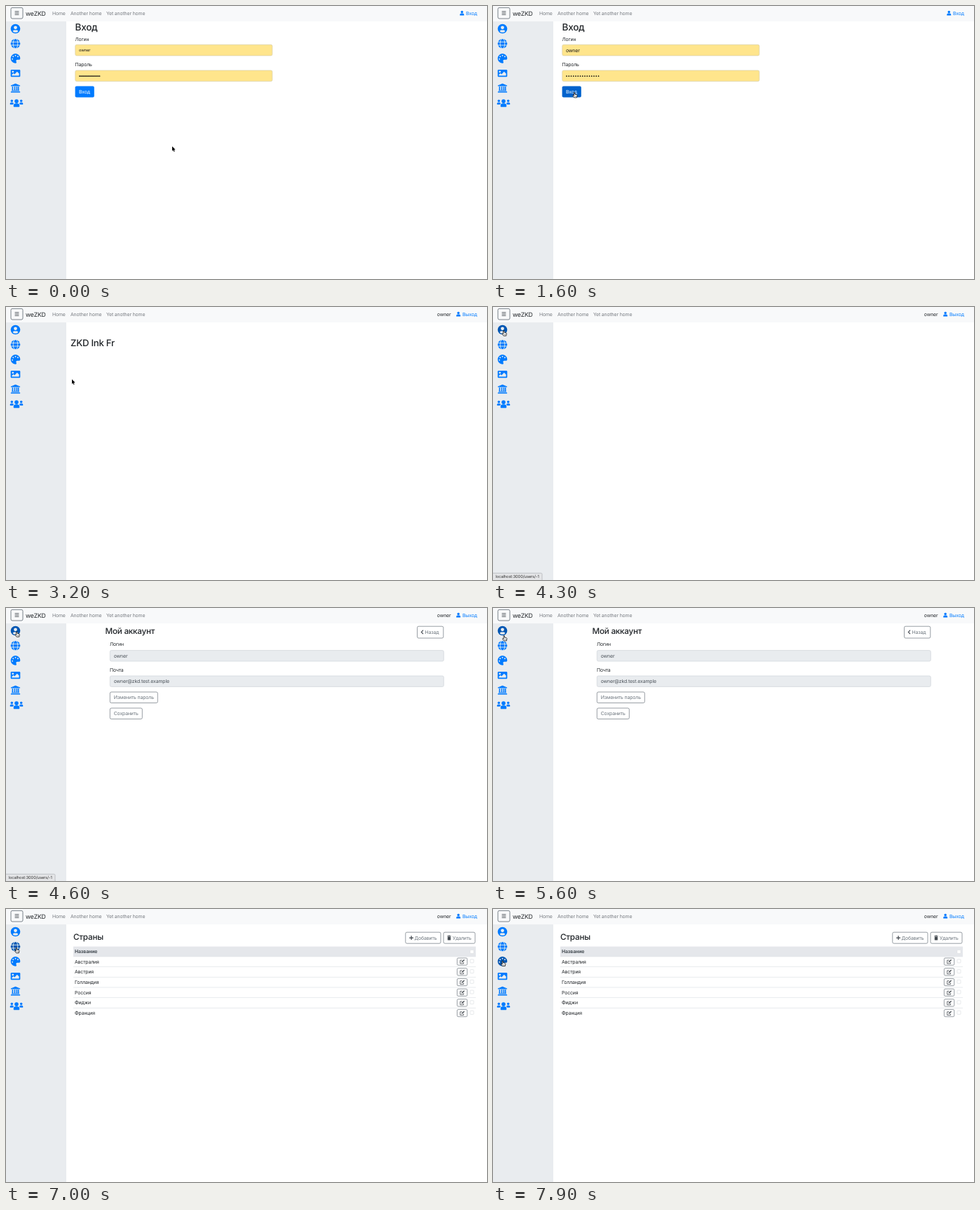
Write an HTML page with a canvas that moves like this. It is 686x390 px and loops after 8 s.

```html
<!DOCTYPE html>
<html lang="ru">
<head>
<meta charset="utf-8">
<title>weZKD</title>
<style>
  html, body { margin: 0; width: 100%; height: 100%; overflow: hidden; background: #fff; }
  canvas { display: block; width: 686px; height: 390px; }
</style>
</head>
<body>
<canvas id="stage"></canvas>
<script>
const W = 686, H = 390, LOOP = 8000, STEP = 100;
const canvas = document.getElementById('stage');
const dpr = window.devicePixelRatio || 1;
canvas.width = W * dpr;
canvas.height = H * dpr;
const ctx = canvas.getContext('2d');

const BLUE = '#007bff', DARK_BLUE = '#0056b3', INK = '#212529', GREY = '#6c757d';
const SIDE = '#e9ecef', NAV = '#f8f9fa', LINE = '#dee2e6';
const FONT = 'Inter, "Open Sans", sans-serif';
const USER = 'owner', BRAND = 'weZKD', SLOGAN = 'ZKD Ink Frontend';
const COUNTRIES = ['Австралия', 'Австрия', 'Голландия', 'Россия', 'Фиджи', 'Франция'];

// Moments of the session, in ms
const T = { fill: 1300, home: 1900, type: 2300, account: 4200, accountReady: 4500, countries: 6300, countriesReady: 6500 };
const LINKS = [
  { from: 4100, to: 5000, url: 'localhost:3000/users/-1', w: 70 },
  { from: 6200, to: 7000, url: 'localhost:3000/countries', w: 73.5 }
];
const MOUSE = [
  [100, 237, 200.5], [900, 116, 123.3], [2600, 116, 123.3], [3200, 94, 103.3], [3900, 15.3, 33.6],
  [5400, 15.3, 33.6], [5600, 15.8, 39.3], [6000, 14.8, 55.3], [7200, 14.8, 55.3], [7700, 13.8, 74]
];

function text(s, x, y, size = 6.9, color = INK, weight = 400) {
  ctx.font = `${weight} ${size}px ${FONT}`;
  ctx.letterSpacing = `${-0.02 * size}px`;
  ctx.fillStyle = color;
  ctx.fillText(s, x, y);
}

function rect(x, y, w, h, color) {
  ctx.fillStyle = color;
  ctx.fillRect(x, y, w, h);
}

function box(x, y, w, h, fill, stroke, r = 2, lw = 0.7) {
  ctx.beginPath();
  ctx.roundRect(x, y, w, h, r);
  if (fill) { ctx.fillStyle = fill; ctx.fill(); }
  if (stroke) { ctx.strokeStyle = stroke; ctx.lineWidth = lw; ctx.stroke(); }
}

function disc(x, y, r, color) {
  ctx.fillStyle = color;
  ctx.beginPath();
  ctx.arc(x, y, r, 0, 7);
  ctx.fill();
}

function poly(color, ...p) {
  ctx.fillStyle = color;
  ctx.beginPath();
  for (let i = 0; i < p.length; i += 2) ctx.lineTo(p[i], p[i + 1]);
  ctx.closePath();
  ctx.fill();
}

function stroke(color, lw, ...p) {
  ctx.strokeStyle = color;
  ctx.lineWidth = lw;
  ctx.beginPath();
  for (let i = 0; i < p.length; i += 2) ctx.lineTo(p[i], p[i + 1]);
  ctx.stroke();
}

function at(x, y, draw) {
  ctx.save();
  ctx.translate(x, y);
  draw();
  ctx.restore();
}

// Head and shoulders; (x, y) is the centre of the head
function person(x, y, r, w, h, color) {
  disc(x, y, r, color);
  box(x - w / 2, y + r + 0.3, w, h, color, null, [w * 0.33, w * 0.33, 0.6, 0.6]);
}

const ICONS = [
  c => {
    disc(0, 0, 6.8, c);
    disc(0, -1.7, 2.4, SIDE);
    ctx.fillStyle = SIDE;
    ctx.beginPath();
    ctx.moveTo(-4, 3.4);
    ctx.quadraticCurveTo(-3, 1.8, -1.2, 1.7);
    ctx.quadraticCurveTo(0, 2.2, 1.2, 1.7);
    ctx.quadraticCurveTo(3, 1.8, 4, 3.4);
    ctx.quadraticCurveTo(2.4, 5.3, 0, 5.3);
    ctx.quadraticCurveTo(-2.4, 5.3, -4, 3.4);
    ctx.fill();
  },
  c => {
    disc(0, 0, 6.8, c);
    ctx.strokeStyle = SIDE;
    ctx.lineWidth = 0.9;
    ctx.beginPath();
    ctx.ellipse(0, 0, 3.3, 7.2, 0, 0, 7);
    ctx.stroke();
    for (const y of [-2.3, 2.3]) stroke(SIDE, 0.9, -7, y, 7, y);
  },
  c => {
    ctx.fillStyle = c;
    ctx.beginPath();
    ctx.moveTo(0.6, 6.8);
    ctx.arc(0, 0, 6.8, 1.5, 6.28);
    ctx.quadraticCurveTo(6.8, 1.9, 4.6, 1.9);
    ctx.lineTo(2.6, 1.9);
    ctx.bezierCurveTo(0.9, 1.9, 0.5, 3.4, 1.2, 4.6);
    ctx.quadraticCurveTo(2, 6.4, 0.6, 6.8);
    ctx.fill();
    for (const [x, y] of [[-4.3, 0.9], [-3.3, -2.6], [0, -4.2], [3.4, -2.6]]) disc(x, y, 0.95, SIDE);
  },
  c => {
    box(-6.8, -5.1, 13.6, 10.2, c, null, 1.3);
    disc(-3.7, -2.2, 1.3, SIDE);
    poly(SIDE, -5.1, 3.4, -5.1, 1.8, -2.9, -0.2, -1.3, 1.3, 2.3, -2.3, 5.1, 0.5, 5.1, 3.4);
  },
  c => {
    poly(c, 0, -6.6, 6.6, -3.9, 6.6, -2.9, -6.6, -2.9, -6.6, -3.9);
    for (const x of [-4.9, -1.8, 1.1, 3.4]) rect(x, -2.2, 1.6, 5.4, c);
    rect(-5.5, 3, 11, 1.1, c);
    rect(-6.6, 4.8, 13.2, 1.5, c);
  },
  c => {
    person(-5.2, -2.9, 1.75, 5, 3.1, c);
    person(8.2, -2.9, 1.75, 5, 3.1, c);
    disc(1.5, -1.9, 3.5, SIDE);
    box(-3.4, 0.2, 9.8, 6, SIDE, null, 3);
    person(1.5, -2.4, 2.8, 8.4, 5, c);
  }
];

function navbar(loggedIn) {
  rect(0, 0, W, 22, NAV);
  box(7, 2.4, 17, 15.6, null, GREY, 2, 0.9);
  for (let i = 0; i < 3; i++) rect(12.6, 7.4 + i * 2.2, 5.8, 0.9, '#444a50');
  text(BRAND, 28, 13.6, 8.7);
  text('Home', 66, 13, 6.9, '#777b80');
  text('Another home', 92, 13, 6.9, '#777b80');
  text('Yet another home', 143, 13, 6.9, '#777b80');
  if (loggedIn) text(USER, 614.8, 13);
  person(loggedIn ? 645.2 : 650.3, 8.5, 1.75, 6, 3, BLUE);
  if (loggedIn) text('Выход', 651, 13, 6.9, BLUE);
  else text('Вход', 656, 13, 6.9, BLUE);
}

function sidebar(hover) {
  rect(0, 22, 86, H - 22, SIDE);
  ICONS.forEach((icon, i) => at(13.5, 32.5 + i * 21.2, () => icon(i === hover ? DARK_BLUE : BLUE)));
}

function loginPage(t, hover) {
  const filled = t >= T.fill;
  text('Вход', 98.5, 35.4, 13.6, INK, 500);
  text('Логин', 98.5, 49.5);
  text('Пароль', 98.5, 86);
  for (const y of [55.3, 92]) box(98.8, y, 281, 15.6, '#ffe58c', '#d9cfa6');
  text(USER, 104, filled ? 65.6 : 65.4, filled ? 6.9 : 5.7, '#111');
  const gap = filled ? 3.25 : 2.03;
  for (let i = 0; i < 15; i++) disc(105 + i * gap, 100.2, filled ? 0.85 : 0.9, '#111');
  box(98.6, 114.6, 27.2, 15.8, !hover ? BLUE : filled ? '#0062cc' : '#0069d9');
  text('Вход', 104, 125.2, 6.9, '#fff');
}

function homePage(t) {
  const n = Math.floor((t - T.type) / STEP) + 1;
  if (n > 0) text(SLOGAN.slice(0, n), 92, 56.2, 13.2, INK, 500);
}

function button(label, x, y, w, h, tx) {
  box(x, y, w, h, '#fff', GREY);
  text(label, tx, y + h / 2 + 2.5, 6.9, GREY);
}

function field(label, value, y) {
  text(label, 148, y - 6.4);
  box(148.3, y, 476, 15.4, SIDE, '#ced4da');
  text(value, 153.7, y + 10.4, 6.9, '#495057');
}

function accountPage() {
  text('Мой аккаунт', 141.5, 37.3, 11.7, INK, 500);
  button('Назад', 586.5, 26.2, 37.3, 16.8, 597.6);
  stroke('#444a50', 1.2, 595, 31.6, 592.4, 34.4, 595, 37.2);
  field('Логин', USER, 60.6);
  field('Почта', USER + '@zkd.test.example', 97);
  button('Изменить пароль', 148.3, 120, 68, 15.6, 153.7);
  button('Сохранить', 148.3, 143, 46, 15.6, 153.7);
}

function editButton(y) {
  box(643.4, y - 5.2, 14.4, 10.2, '#fff', GREY, 1.6);
  stroke('#444a50', 0.8, 650.6, y - 2, 647.8, y - 2, 647.8, y + 2.8, 652.6, y + 2.8, 652.6, y + 0.8);
  stroke('#444a50', 1.4, 650, y + 0.8, 653.6, y - 2.6);
}

function countriesPage() {
  text('Страны', 96, 44, 11.7, INK, 500);
  button('Добавить', 569.8, 33.2, 50.2, 16, 582.6);
  rect(575.2, 40.6, 5.8, 1.3, '#444a50');
  rect(577.45, 38.3, 1.3, 5.8, '#444a50');
  button('Удалить', 624, 33.2, 45, 16, 637);
  rect(629.3, 38.3, 5.4, 0.9, '#444a50');
  rect(631, 37.6, 2, 0.8, '#444a50');
  box(629.8, 39.6, 4.4, 4.8, '#444a50', null, 0.5);

  rect(96, 53.6, 574, 14.4, '#e5e7eb');
  rect(96, 67.6, 574, 0.7, LINE);
  text('Название', 98, 63.4, 6.9, '#495057', 700);
  box(662, 58.6, 5, 5, '#fff', '#d8dadd', 0.8, 0.5);
  COUNTRIES.forEach((name, i) => {
    const y = 75.2 + i * 14.72;
    text(name, 98, y + 2.4);
    editButton(y);
    box(662, y - 3.3, 5, 5, '#fff', '#cfd2d6', 0.8, 0.5);
    if (i < COUNTRIES.length - 1) rect(96, y + 7, 574, 0.7, LINE);
  });
}

function statusBar(link) {
  box(-2, 380.2, link.w + 2, 12, '#e4e5e7', '#b4b7ba', 1.5, 0.8);
  text(link.url, 3.6, 387.2, 5.75, '#333');
}

function mouseAt(t) {
  const i = MOUSE.findIndex(k => k[0] > t);
  if (i < 0) return MOUSE[MOUSE.length - 1].slice(1);
  if (i === 0) return MOUSE[0].slice(1);
  const [t0, x0, y0] = MOUSE[i - 1], [t1, x1, y1] = MOUSE[i];
  const k = (t - t0) / (t1 - t0);
  return [x0 + (x1 - x0) * k, y0 + (y1 - y0) * k];
}

function arrow() {
  ctx.lineJoin = 'round';
  const shape = [0, 0, 0, 6.6, 1.5, 5.3, 2.5, 7.7, 3.6, 7.2, 2.6, 4.9, 4.6, 4.8];
  stroke('#fff', 1.2, ...shape, 0, 0);
  poly('#000', ...shape);
}

function hand() {
  ctx.lineJoin = 'round';
  const shape = [-0.7, 0.3, 0.5, 0.3, 0.7, 2.8, 3.4, 3.3, 4.1, 4.2, 3.5, 7.6, -0.2, 7.6, -2.3, 4.9, -1.8, 4.1, -0.6, 5];
  poly('#fff', ...shape);
  stroke('#111', 0.8, ...shape, -0.7, 0.3);
  for (const x of [1, 2.3]) stroke('#111', 0.4, x, 4.8, x, 6.6);
}

function draw(t) {
  const [mx, my] = mouseAt(t);
  const onLogin = t < T.home;
  const row = mx < 24 && my > 22 ? Math.floor((my - 22) / 21.2) : -1;
  const onButton = onLogin && mx > 98 && mx < 126 && my > 114 && my < 131;

  ctx.setTransform(dpr, 0, 0, dpr, 0, 0);
  ctx.textRendering = 'geometricPrecision';
  rect(0, 0, W, H, '#fff');
  navbar(!onLogin);
  sidebar(row);

  if (onLogin) loginPage(t, onButton);
  else if (t < T.account) homePage(t);
  else if (t >= T.accountReady && t < T.countries) accountPage();
  else if (t >= T.countriesReady) countriesPage();

  const link = LINKS.find(l => t >= l.from && t < l.to);
  if (link) statusBar(link);
  at(mx, my, row >= 0 || onButton ? hand : arrow);
}

function tick(now) {
  draw(Math.floor((now % LOOP) / STEP) * STEP);
  requestAnimationFrame(tick);
}
requestAnimationFrame(tick);
</script>
</body>
</html>
```
